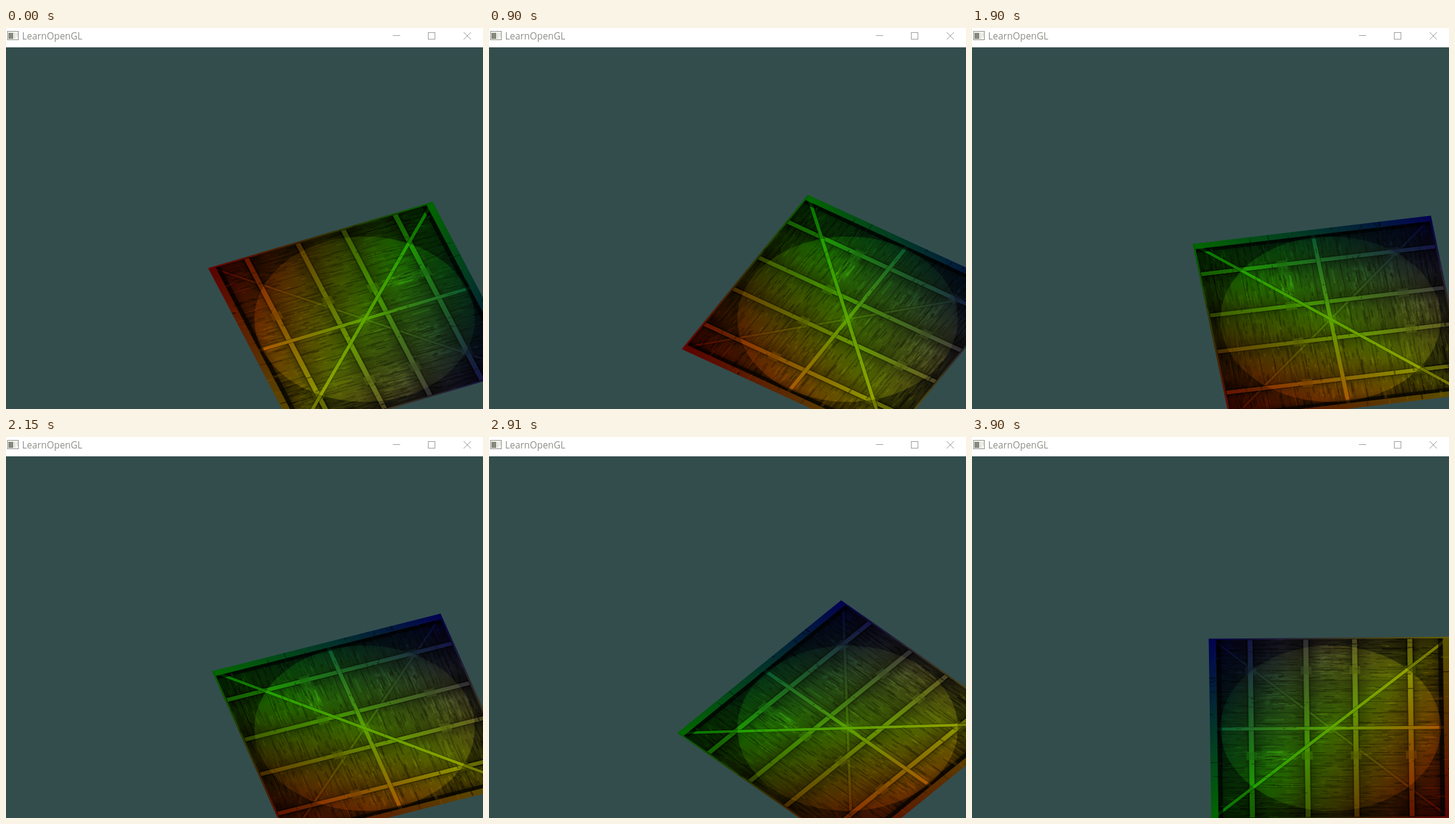
An HTML page with a canvas for the animation above (3.98 s loop, 789 px wide and 630 px high).

```html
<!DOCTYPE html>
<html lang="en">
<head>
<meta charset="utf-8">
<title>LearnOpenGL</title>
<style>
  html, body { margin: 0; width: 100%; height: 100%; overflow: hidden; background: #334d4d; }
  canvas, svg { position: absolute; left: 0; top: 0; display: block; }
  text { font: 15.4px "Open Sans", "Noto Sans", sans-serif; fill: #8e8f88; }
</style>
</head>
<body>
<canvas id="view" width="789" height="630"></canvas>
<svg width="789" height="32" viewBox="0 0 789 32">
  <rect width="789" height="32" fill="#fff"/>
  <rect x="2.5" y="5.5" width="18" height="14" fill="#f4f5f0" stroke="#8b8d84"/>
  <rect x="4" y="8" width="8" height="10" fill="#858a7c"/>
  <path d="M14.5 8v10M18.5 8v6" stroke="#c9cbc4"/>
  <text x="26.6" y="19">LearnOpenGL</text>
  <g fill="none" stroke="#999">
    <path d="M640 12.5h12"/>
    <rect x="698.5" y="7.5" width="11" height="11"/>
    <path d="M757 7l12 12M769 7l-12 12"/>
  </g>
</svg>
<script>
const LOOP = 3980, N = 512;
const CENTER = [593.2, 481.5], HALF = [199.6, 149.7];

// [step, start in ms] and [step, degrees]; straight lines between the points
const STARTS = [[0, 0], [1, 70], [7, 520], [8, 600], [12, 900], [14, 1060], [15, 1130],
  [19, 1440], [21, 1600], [22, 1670], [25, 1900], [28, 2150], [29, 2220], [32, 2450],
  [35, 2680], [36, 2760], [42, 3220], [43, 3300], [44, 3360], [45, 3450], [49, 3750],
  [50, 3830], [51, 3900]];
const ANGLES = [[0, 111.5], [12, 148.5], [19, 170.5], [25, 189], [32, 211.3], [44, 249.4], [51, 270.6]];

function lerpTable(table, x) {
  let i = 1;
  while (i < table.length - 1 && table[i][0] < x) i++;
  const [x0, y0] = table[i - 1], [x1, y1] = table[i];
  return y0 + (y1 - y0) * (x - x0) / (x1 - x0);
}

const steps = Array.from({ length: 52 }, (_, i) => ({
  start: lerpTable(STARTS, i),
  angle: lerpTable(ANGLES, i) * Math.PI / 180
}));

let seed = 11;
function rand() {
  seed = (seed * 16807) % 2147483647;
  return seed / 2147483647;
}

function layer() {
  const c = document.createElement('canvas');
  c.width = c.height = N;
  return c.getContext('2d');
}

// Coordinates from 0 to 1 across the crate
function box(g, x, y, w, h, fill) {
  g.fillStyle = fill;
  g.fillRect(x * N, y * N, w * N, h * N);
}

function fade(g, x0, y0, x1, y1, stops) {
  const grad = g.createLinearGradient(x0 * N, y0 * N, x1 * N, y1 * N);
  stops.forEach(([at, color]) => grad.addColorStop(at, color));
  return grad;
}

function glow(g, x, y, r, color) {
  const grad = g.createRadialGradient(x * N, y * N, 0, x * N, y * N, r * N);
  grad.addColorStop(0, color);
  grad.addColorStop(1, 'rgba(150,135,105,0)');
  box(g, x - r, y - r, 2 * r, 2 * r, grad);
}

function streaks(g, count, x, y, w, h, long, tone) {
  for (let i = 0; i < count; i++) {
    const len = long * (0.2 + rand());
    box(g, x + rand() * w, y + rand() * h - len / 2, 0.003 + rand() * 0.005, len, tone());
  }
}

const woodTone = () => rand() < 0.5
  ? `rgba(8,7,5,${0.15 + rand() * 0.4})`
  : `rgba(140,126,98,${0.08 + rand() * 0.26})`;
const scuffTone = () => `rgba(150,138,112,${0.15 + rand() * 0.35})`;

function drawPlanks(g, beams) {
  box(g, 0, 0, 1, 1, '#4a4332');
  for (let i = 0; i < 17; i++) {
    box(g, i / 17, 0, 1 / 17, 1, `rgba(0,0,0,${rand() * 0.15})`);
    box(g, i / 17, 0, 0.004, 1, 'rgba(0,0,0,.5)');
  }
  streaks(g, 1500, 0, 0, 1, 1, 0.07, woodTone);
  streaks(g, 60, 0.62, 0.62, 0.05, 0.2, 0.05, scuffTone);
  streaks(g, 70, 0.04, 0.42, 0.16, 0.14, 0.05, scuffTone);
  streaks(g, 60, 0.2, 0.64, 0.2, 0.14, 0.05, scuffTone);

  const rows = [0.03, ...beams, 0.97];
  for (let i = 1; i < rows.length; i++) {
    const a = rows[i - 1], b = rows[i];
    const mid = i === rows.length - 1 ? 'rgba(0,0,0,.3)' : 'rgba(0,0,0,.05)';
    box(g, 0, a, 1, b - a, fade(g, 0, a, 0, b, [
      [0, 'rgba(0,0,0,.5)'], [0.35, mid], [0.7, mid], [1, 'rgba(0,0,0,.5)']]));
  }
  box(g, 0, 0, 1, 1, fade(g, 0, 0, 1, 0, [
    [0, 'rgba(0,0,0,.35)'], [0.12, 'rgba(0,0,0,0)'], [0.88, 'rgba(0,0,0,0)'], [1, 'rgba(0,0,0,.35)']]));
}

function brace(g, x0, y0, x1, y1, width, color) {
  g.strokeStyle = color;
  g.lineWidth = width * N;
  g.beginPath();
  g.moveTo(x0 * N, y0 * N);
  g.lineTo(x1 * N, y1 * N);
  g.stroke();
}

function drawFrame(g, beams) {
  brace(g, 0.02, 0.97, 0.98, 0.03, 0.02, 'rgba(0,0,0,.35)');
  brace(g, 0.02, 0.97, 0.98, 0.03, 0.011, 'rgba(104,94,72,.75)');
  for (const y of beams) {
    box(g, 0, y - 0.017, 1, 0.034, 'rgba(0,0,0,.45)');
    box(g, 0.01, y - 0.0105, 0.98, 0.021, '#7a6f56');
    for (const x of [0.18, 0.65]) box(g, x - 0.022, y - 0.022, 0.044, 0.044, 'rgba(100,90,68,.6)');
  }
  box(g, 0.488, 0.03, 0.024, 0.94, 'rgba(0,0,0,.4)');
  box(g, 0.4915, 0.03, 0.017, 0.94, '#857a5e');
  brace(g, 0.01, 0.01, 0.99, 0.99, 0.022, 'rgba(0,0,0,.35)');
  brace(g, 0.01, 0.01, 0.99, 0.99, 0.014, '#857a5e');
  glow(g, 0.5, 0.5, 0.04, 'rgba(150,135,105,.6)');

  for (const [rim, gap, color] of [[0, 0.03, '#5c533f'], [0.97, 0.95, '#6f6652']]) {
    box(g, 0, gap, 1, 0.02, 'rgba(4,3,2,.7)');
    box(g, 0, rim, 1, 0.03, color);
  }
  for (const x of [0, 0.992]) box(g, x, 0, 0.008, 1, '#6a604a');
}

function drawTint() {
  const g = layer();
  g.globalCompositeOperation = 'lighter';
  box(g, 0, 0, 1, 1, fade(g, 0, 0, 0, 1, [[0, '#f00'], [1, '#000']]));
  box(g, 0, 0, 1, 1, fade(g, 0, 1, 1, 0, [[0, '#000'], [0.5, '#0f0'], [1, '#000']]));
  box(g, 0, 0, 1, 1, fade(g, 0, 1, 0.5, 0.5, [[0, '#00f'], [1, '#000']]));
  return g.canvas;
}

function makeCrate() {
  const g = layer(), beams = [0.167, 0.396, 0.598, 0.829];
  drawPlanks(g, beams);
  drawFrame(g, beams);
  streaks(g, 500, 0, 0, 1, 1, 0.03, woodTone);
  g.globalCompositeOperation = 'lighter';
  g.fillStyle = 'rgb(46,40,13)';
  g.beginPath();
  g.arc(N / 2, N / 2, 0.4565 * N, 0, 2 * Math.PI);
  g.fill();
  g.globalCompositeOperation = 'multiply';
  g.drawImage(drawTint(), 0, 0);
  return g.canvas;
}

const ctx = document.getElementById('view').getContext('2d');
const crate = makeCrate();
ctx.imageSmoothingQuality = 'high';
let shown = -1;

function render(time) {
  const t = time % LOOP;
  let i = steps.length - 1;
  while (i > 0 && steps[i].start > t) i--;
  if (i === shown) return;
  shown = i;
  ctx.fillStyle = '#334d4d';
  ctx.fillRect(0, 0, 789, 630);
  ctx.save();
  ctx.translate(...CENTER);
  ctx.scale(...HALF);
  ctx.rotate(-steps[i].angle);
  ctx.drawImage(crate, -1, -1, 2, 2);
  ctx.restore();
}

const begin = performance.now();
function tick() {
  render(performance.now() - begin);
  requestAnimationFrame(tick);
}
render(0);
requestAnimationFrame(tick);
</script>
</body>
</html>
```
